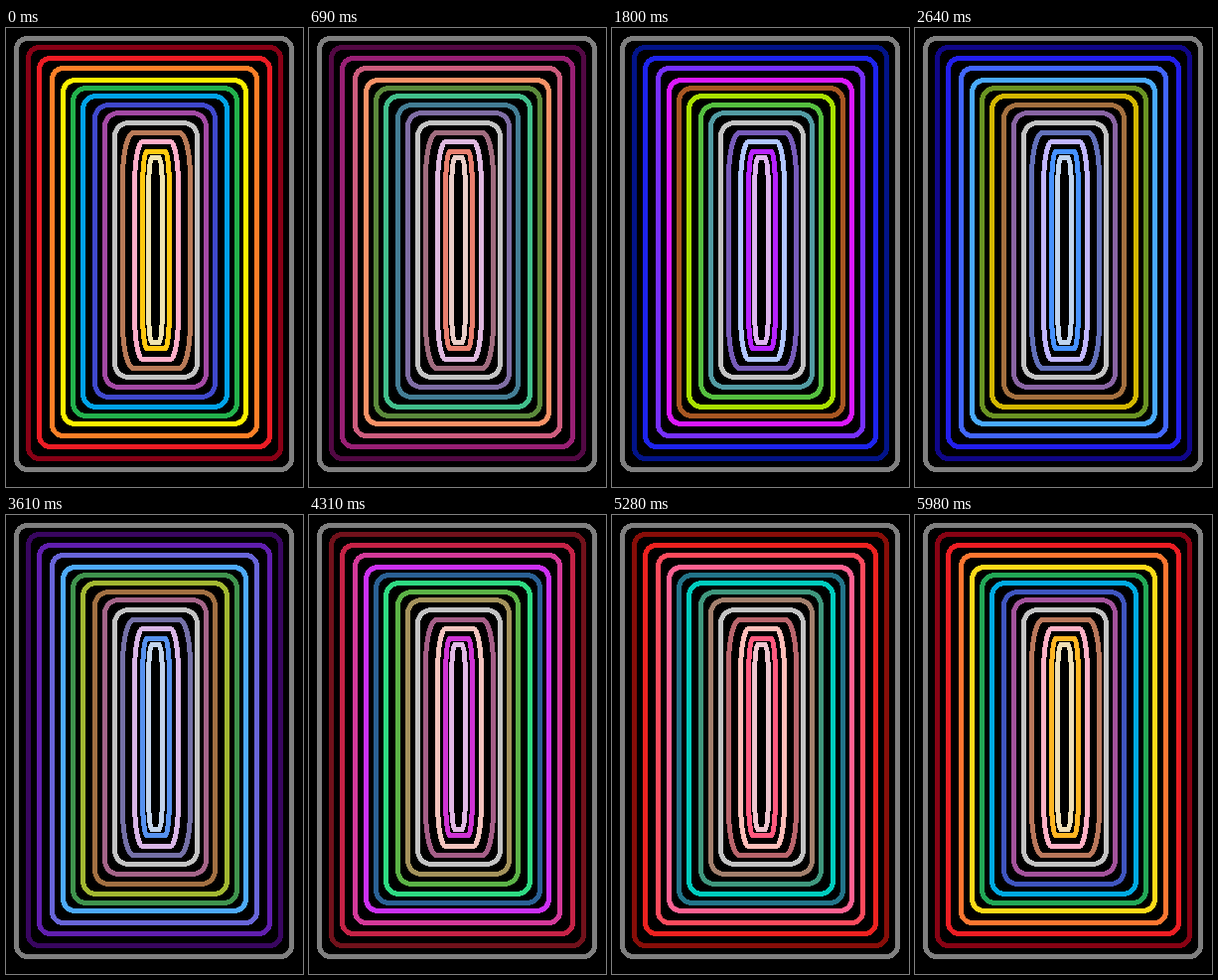
An HTML page without scripts that plays this animation: 299 px wide and 462 px high, repeating every 6.12 s.

```html
<!DOCTYPE html>
<html lang="en">
<head>
<meta charset="utf-8">
<title>Nested colour frames</title>
<style>
  html, body { margin: 0; width: 100%; height: 100%; overflow: hidden; background: #000; }
  svg { display: block; width: 299px; height: 462px; }
  rect { fill: none; stroke-width: 5; shape-rendering: crispEdges; }
  .ring {
    --rgb: rgb(var(--r), var(--g), var(--b));
    --gbr: rgb(var(--g), var(--b), var(--r));
    --bgr: rgb(var(--b), var(--g), var(--r));
    --rbg: rgb(var(--r), var(--b), var(--g));
    stroke: var(--rgb);
    /* the tiny offset keeps step edges clear of rounding */
    animation: swap 6120ms -2ms infinite steps(9, jump-both);
  }
  /* each channel order holds 270 ms, then blends in 140 ms steps */
  @keyframes swap {
    0%, 4.41176% { stroke: var(--rgb); }
    25%, 29.41176% { stroke: var(--gbr); }
    50%, 54.41176% { stroke: var(--bgr); }
    75%, 79.41176% { stroke: var(--rbg); }
    100% { stroke: var(--rgb); }
  }
</style>
</head>
<body>
<svg viewBox="0 0 299 462">
  <rect x="10.5" y="10.5" width="277" height="434" rx="11" stroke="#7f7f7f"/>
  <rect class="ring" x="22.5" y="19.5" width="254" height="414" rx="11" style="--r:136;--g:0;--b:21"/>
  <rect class="ring" x="33.5" y="30.5" width="232" height="391" rx="11" style="--r:237;--g:28;--b:36"/>
  <rect class="ring" x="46.5" y="40.5" width="206" height="370" rx="11" style="--r:255;--g:127;--b:39"/>
  <rect class="ring" x="57.5" y="52.5" width="184" height="346" rx="12" style="--r:255;--g:242;--b:0"/>
  <rect class="ring" x="67.5" y="60.5" width="165" height="330" rx="13" style="--r:34;--g:177;--b:76"/>
  <rect class="ring" x="77.5" y="68.5" width="145" height="313" rx="13" style="--r:0;--g:162;--b:232"/>
  <rect class="ring" x="89.5" y="77.5" width="121" height="294" rx="14" style="--r:63;--g:72;--b:204"/>
  <rect class="ring" x="99.5" y="85.5" width="102" height="276" rx="14" style="--r:163;--g:73;--b:164"/>
  <rect x="109.5" y="95.5" width="83" height="256" rx="14" stroke="#c3c3c3"/>
  <rect class="ring" x="117.5" y="105.5" width="68" height="237" rx="11" ry="45" style="--r:185;--g:122;--b:87"/>
  <rect class="ring" x="129.5" y="114.5" width="44" height="219" rx="8" ry="45" style="--r:255;--g:174;--b:201"/>
  <rect class="ring" x="137.5" y="124.5" width="27" height="198" rx="4" ry="40" style="--r:255;--g:201;--b:14"/>
  <rect class="ring" x="143.5" y="130.5" width="14" height="186" rx="3" ry="38" style="--r:239;--g:228;--b:176"/>
</svg>
</body>
</html>
```
